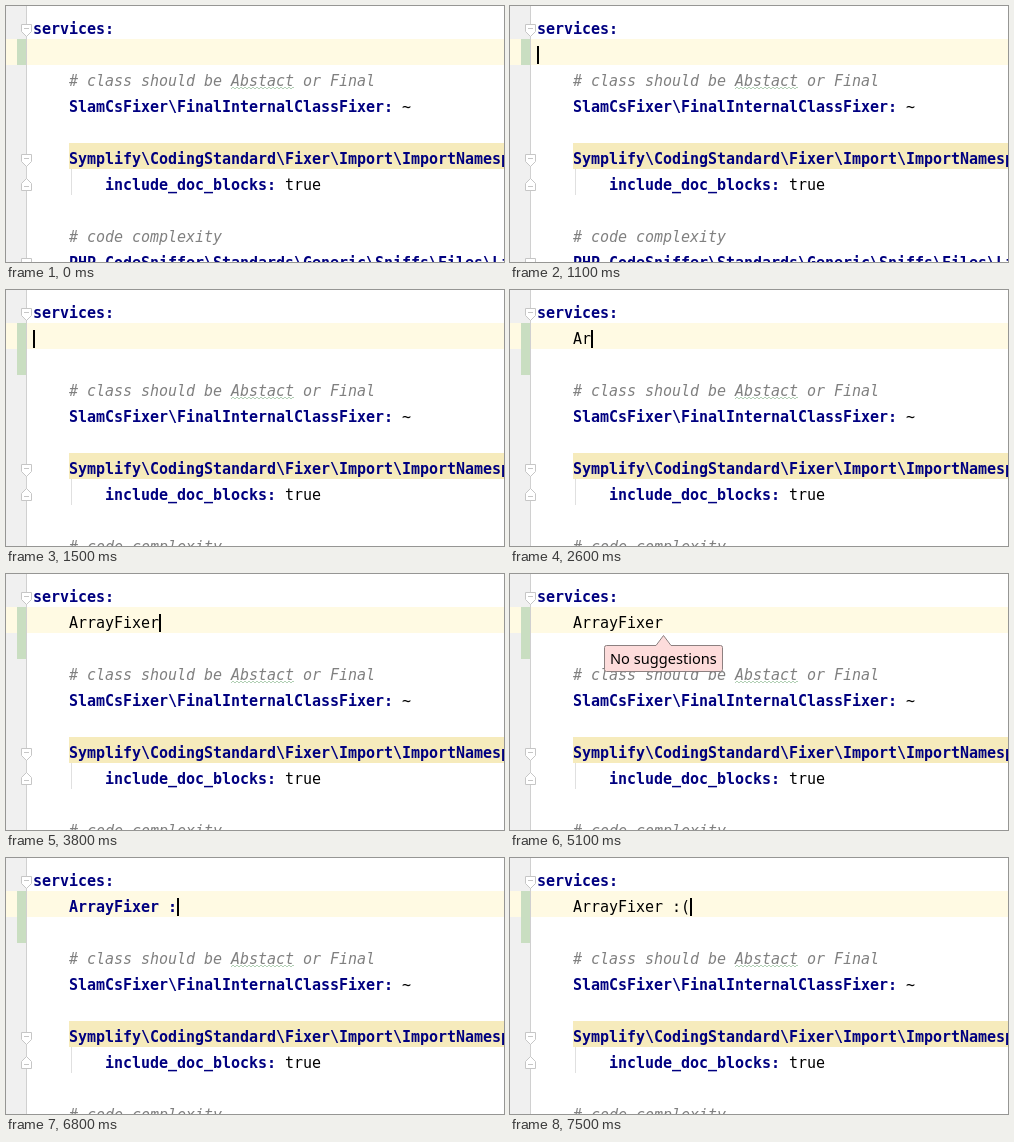
These frames come from a looping animation (498x256 px, 8000 ms). An HTML page:

```html
<!DOCTYPE html>
<html lang="en">
<head>
<meta charset="utf-8">
<title>Editor typing</title>
<style>
  html, body { margin: 0; width: 100%; height: 100%; overflow: hidden; background: #fff; }
  svg { display: block; }
  /* snap the monospace grid to whole 9px cells */
  text { font: 15px "DejaVu Sans Mono", monospace; letter-spacing: calc(9px - 1ch); fill: #000; white-space: pre; }
  .key { font-weight: bold; fill: #000080; }
  .note { font-style: italic; fill: #808080; }
  .tip { font: 14.6px "Noto Sans", "Open Sans", sans-serif; letter-spacing: normal; }
  .band { fill: #fffae3; }
  .added { fill: #c9dec1; }
  .fold { fill: #fff; stroke: #c6c6c6; }

  .row, .lower, .added2, .caret, .blink, .plain, .bold, .error, .popup {
    animation: 8s step-end infinite;
  }
  .row { animation-name: row; }
  .lower { animation-name: lower; }
  .added2 { animation-name: added; }
  .caret { animation-name: caret; }
  .blink { animation-name: blink; }
  .plain { animation-name: plain; }
  .bold { animation-name: bold; }
  .error { animation-name: error; }
  .popup { animation-name: popup; }

  @keyframes row {
    0%, 18.75%, 100% { transform: translateY(0); }
    15% { transform: translateY(26px); }
  }
  @keyframes lower {
    0% { transform: translateY(0); }
    15%, 100% { transform: translateY(26px); }
  }
  @keyframes added {
    0% { opacity: 0; }
    15%, 100% { opacity: 1; }
  }
  @keyframes caret {
    0% { transform: translateX(27px); }
    21.25% { transform: translateX(63px); }
    26.25% { transform: translateX(72px); }
    32.5% { transform: translateX(81px); }
    33.75% { transform: translateX(90px); }
    35% { transform: translateX(99px); }
    38.75% { transform: translateX(108px); }
    41.25% { transform: translateX(117px); }
    43.75% { transform: translateX(126px); }
    45% { transform: translateX(135px); }
    46.25% { transform: translateX(144px); }
    47.5% { transform: translateX(153px); }
    80% { transform: translateX(162px); }
    85% { transform: translateX(171px); }
    90%, 100% { transform: translateX(180px); }
  }
  @keyframes blink {
    0%, 10%, 63.75%, 76.25% { opacity: 0; }
    3.75%, 13.75%, 71.25%, 80%, 100% { opacity: 1; }
  }
  @keyframes plain {
    0%, 85% { opacity: 0; }
    21.25%, 90%, 100% { opacity: 1; }
  }
  @keyframes bold {
    0%, 90%, 100% { opacity: 0; }
    85% { opacity: 1; }
  }
  @keyframes error {
    0%, 93.75%, 100% { opacity: 0; }
    88.75% { opacity: 1; }
  }
  @keyframes popup {
    0%, 82.5%, 100% { opacity: 0; }
    53.75% { opacity: 1; }
  }
</style>
</head>
<body>
<svg width="498" height="256" viewBox="0 0 498 256">
  <defs>
    <pattern id="typo" x="225" y="81" width="4" height="3" patternUnits="userSpaceOnUse">
      <path d="M-1 3L2 0L5 3" fill="none" stroke="#9cc39f" stroke-width=".8"/>
    </pattern>
    <pattern id="wrong" x="63" y="55" width="4" height="3" patternUnits="userSpaceOnUse">
      <path d="M-1 3L2 0L5 3" fill="none" stroke="#f00" stroke-width=".8"/>
    </pattern>
    <g id="open" class="fold">
      <path d="M15.5 11.5h10v7l-5 5l-5-5z"/>
      <path d="M18 15.5h5"/>
    </g>
    <g id="close" class="fold">
      <path d="M15.5 21.5h10v-7l-5-5l-5 5z"/>
      <path d="M18 17.5h5"/>
    </g>
  </defs>

  <!-- gutter and current line -->
  <rect width="20" height="256" fill="#f0f0f0"/>
  <rect class="band row" y="33" width="498" height="26"/>
  <rect class="added" x="11" y="33" width="10" height="26"/>
  <rect class="added added2" x="11" y="59" width="10" height="26"/>
  <rect x="20" width="1" height="256" fill="#d0d0d0"/>
  <use href="#open" y="7"/>
  <text class="key" x="27" y="28">services:</text>

  <!-- typed line, revealed by the cover that travels with the caret -->
  <text class="plain" x="63" y="54">ArrayFixer :(</text>
  <text class="key bold" x="63" y="54">ArrayFixer :</text>
  <g class="row">
    <g class="caret">
      <rect class="band" y="33" width="498" height="26"/>
      <rect class="blink" y="40" width="2" height="18"/>
    </g>
  </g>
  <rect class="error" x="63" y="55" width="108" height="3" fill="url(#wrong)"/>

  <!-- lines pushed down by the new row -->
  <g class="lower">
    <rect x="63" y="137" width="435" height="26" fill="#f6ebbc"/>
    <rect x="65" y="163" width="1" height="26" fill="#e0e0e0"/>
    <text class="note" x="63" y="80"># class should be Abstact or Final</text>
    <rect x="225" y="81" width="63" height="3" fill="url(#typo)"/>
    <text x="63" y="106"><tspan class="key">SlamCsFixer\FinalInternalClassFixer:</tspan> ~</text>
    <text class="key" x="63" y="158">Symplify\CodingStandard\Fixer\Import\ImportNamespacedNameFixer:</text>
    <text x="99" y="184"><tspan class="key">include_doc_blocks:</tspan> true</text>
    <text class="note" x="63" y="236"># code complexity</text>
    <text class="key" x="63" y="262">PHP_CodeSniffer\Standards\Generic\Sniffs\Files\LineLengthSniff:</text>
    <use href="#open" y="137"/>
    <use href="#close" y="163"/>
    <use href="#open" y="241"/>
  </g>

  <g class="popup">
    <path d="M96.5 71.5H146L153.5 61.5L161 71.5H210.5a2 2 0 0 1 2 2V95.5a2 2 0 0 1-2 2H96.5a2 2 0 0 1-2-2V73.5a2 2 0 0 1 2-2z" fill="#fddcdb" stroke="#8c8080"/>
    <text class="tip" x="100" y="90">No suggestions</text>
  </g>
</svg>
</body>
</html>
```
